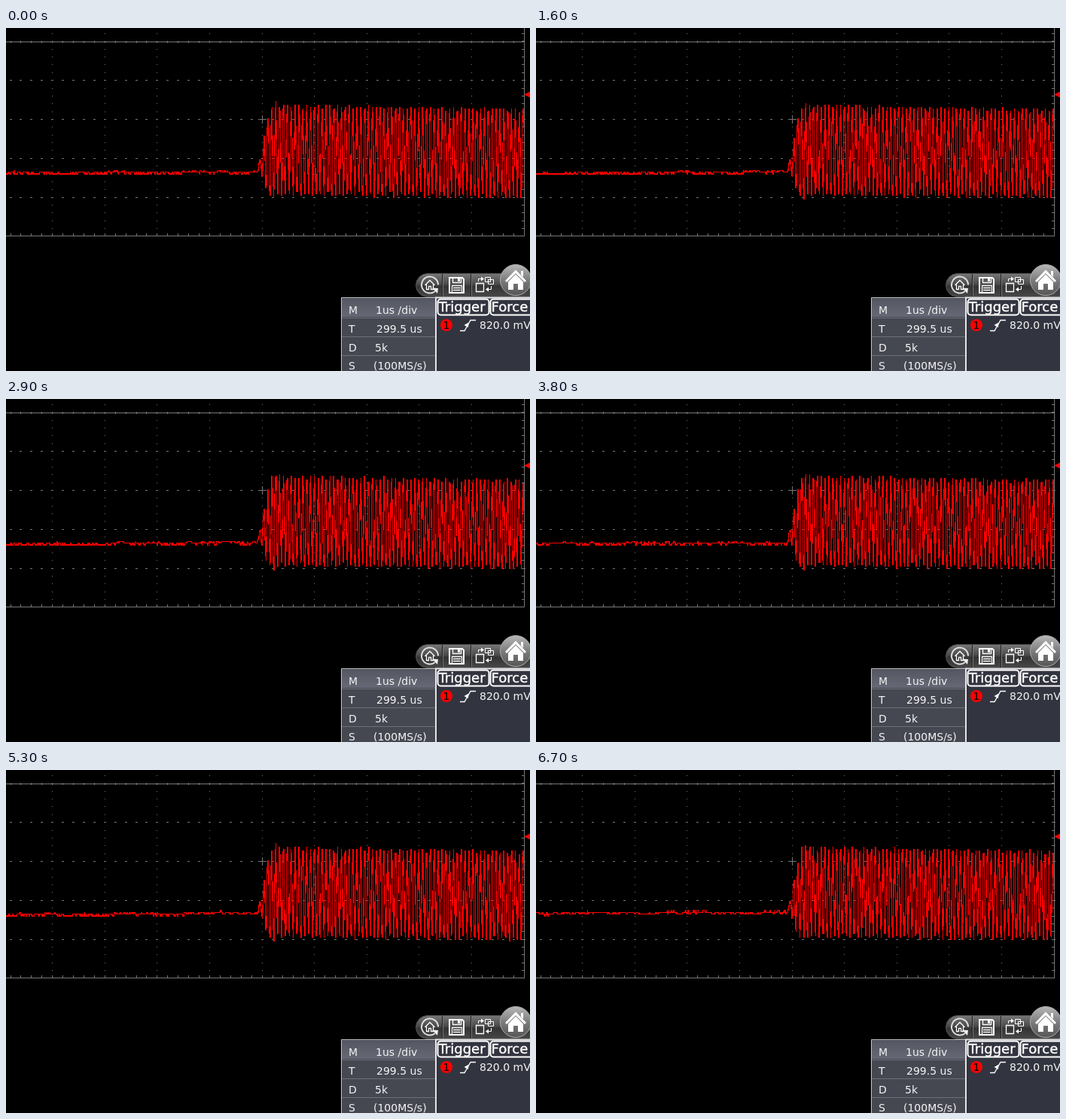
Recreate the animation shown at these times as an HTML page with a canvas. Size 696 px wide and 456 px high, loop 6800 ms.

```html
<!DOCTYPE html>
<html lang="en">
<head>
<meta charset="utf-8">
<title>Oscilloscope burst</title>
<style>
  html, body { margin: 0; width: 100%; height: 100%; overflow: hidden; background: #000; }
  canvas, svg { position: absolute; left: 0; top: 0; width: 696px; height: 456px; display: block; }
  text { font: 14px "DejaVu Sans", sans-serif; fill: #f4f4f4; white-space: pre; }
  .button text { font-size: 18px; fill: #fff; stroke: #fff; stroke-width: .4; }
  .button rect { fill: #32343f; stroke: #fff; stroke-width: 2; }
  .icon { fill: none; stroke: #fff; stroke-width: 1.3; }
</style>
</head>
<body>
<canvas id="scope" width="696" height="456"></canvas>
<svg viewBox="0 0 696 456">
  <defs>
    <linearGradient id="bar" x2="0" y2="1">
      <stop offset="0" stop-color="#777"/>
      <stop offset=".45" stop-color="#4b4b4b"/>
      <stop offset=".55" stop-color="#343434"/>
      <stop offset="1" stop-color="#484848"/>
    </linearGradient>
    <linearGradient id="knob" x2="0" y2="1">
      <stop offset="0" stop-color="#b8b8b8"/>
      <stop offset=".5" stop-color="#7d7d7d"/>
      <stop offset="1" stop-color="#555"/>
    </linearGradient>
    <linearGradient id="row" x2="0" y2="1">
      <stop offset="0" stop-color="#555762"/>
      <stop offset="1" stop-color="#666975"/>
    </linearGradient>
  </defs>

  <path d="M688 88.5L696 84.500V92.500Z" fill="#f00"/>

  <!-- toolbar -->
  <path d="M696 326.5H560a15.5 15.5 0 0 0 0 31H696Z" fill="url(#bar)" stroke="#555"/>
  <path d="M579.5 327V357M617.5 327V357" stroke="#222"/>
  <path d="M580.5 327V357M618.5 327V357" stroke="#777"/>
  <g class="icon">
    <path d="M570 350A11 11 0 1 1 574 341.500" stroke="#ddd" stroke-width="2"/>
    <path d="M556.500 342L563 335.500L569.500 342M558.500 341V347.500H561.500V343.500H564.500V347.500H567.500V341"/>
    <path d="M566 345.500L574 346L573 353Z" fill="#eee" stroke="none"/>
  </g>
  <g class="icon">
    <path d="M589 332H606L608 334V352H589Z" stroke-width="2"/>
    <path d="M593.500 332V338.500H604.500V332M592.500 352V342.500H605.500V352M594 345.500H604M594 348.500H604"/>
    <path d="M600 333H603V337H600Z" fill="#fff" stroke="none"/>
  </g>
  <g class="icon">
    <path d="M624.500 339.500H634.500V350.500H624.500Z"/>
    <path d="M636.500 331.500H643.500V337.500H636.500ZM640.500 334.500H647.500V340.500H640.500Z" stroke-width="1"/>
    <path d="M627.500 337V333.500H632M644.500 343V347.500H640" stroke-width="1"/>
    <path d="M631 330.500L635 333.500L631 336.500ZM641 344.500L637 347.500L641 350.500Z" fill="#fff" stroke="none"/>
  </g>
  <circle cx="677" cy="335" r="20.500" fill="url(#knob)" stroke="#aaa"/>
  <path d="M663 336L677 321.500L691 336L689 338L677 326L665 338Z" fill="#fff"/>
  <path d="M667 337.500L677 327.500L687 337.500V348H680V340H674V348H667ZM684 323H687V331L684 328Z" fill="#fff"/>

  <!-- timebase panel -->
  <path d="M445 358H571V456H445Z" fill="#454751"/>
  <path d="M446 360H570V384H446Z" fill="url(#row)"/>
  <path d="M446 385.500H570M446 410.500H570M446 435.500H570" stroke="#6d6f79"/>
  <path d="M445.500 456V358.500H570" fill="none" stroke="#c4c5ca"/>
  <text x="455" y="380">M</text><text x="491" y="380">1us /div</text>
  <text x="455" y="405">T</text><text x="492" y="405">299.5 us</text>
  <text x="455" y="430">D</text><text x="490" y="430">5k</text>
  <text x="455" y="454">S</text><text x="488" y="454">(100MS/s)</text>

  <!-- trigger panel -->
  <path d="M572 358H696V456H572Z" fill="#32343f"/>
  <path d="M571 456V358.500H696" fill="none" stroke="#e4e4e8" stroke-width="2"/>
  <g class="button">
    <rect x="573.500" y="360.500" width="68" height="21" rx="4"/>
    <rect x="643.500" y="360.500" width="60" height="21" rx="4"/>
    <text x="574.500" y="377">Trigger</text>
    <text x="644.500" y="377">Force</text>
  </g>
  <circle cx="585" cy="395" r="8" fill="#f00"/>
  <text x="580.500" y="400" style="fill:#000">1</text>
  <path class="icon" d="M603 402.500H609L617 388.500H624"/>
  <path d="M614.500 391.500L608.500 395L614 398Z" fill="#fff"/>
  <text x="629" y="400">820.0 mV</text>
</svg>
<script>
const LOOP = 6800, STEP = 100;
const DIV_X = 69.6, DIV_Y = 51.8, RIGHT = 687.6, BOTTOM = 276.4, AXIS = 18;
const LEVEL = 2.55, FLOOR = 194;          // height of one converter step, idle row
const SAMPLE = DIV_X / 100;               // 100 MS/s at 1 us per division
const HALF = DIV_X / 13.56 / 2;           // half a carrier cycle
const START = 337;
const ATTACK = [174, 196, 144, 215, 119, 223, 102, 227, 97, 223, 101];

// step, idle level at the left, idle level at the trigger
const DRIFT = [
  [0, 193.3, 191.4], [16, 194.1, 191], [29, 193.6, 190.6], [38, 191.9, 191.6],
  [46, 192.8, 189.2], [59, 193.2, 191.4], [67, 190, 189.5], [68, 193.3, 191.4]
];

const ctx = document.getElementById("scope").getContext("2d");
const mix = (a, b, f) => a + (b - a) * f;
const dot = (x, y, w, h) => ctx.fillRect(Math.round(x), Math.round(y), w, h);

function random(seed) {
  let s = (seed + 1) * 2654435761 >>> 0;
  return () => {
    s = s + 0x6d2b79f5 >>> 0;
    let v = Math.imul(s ^ s >>> 15, s | 1);
    v ^= v + Math.imul(v ^ v >>> 7, v | 61);
    return ((v ^ v >>> 14) >>> 0) / 4294967296;
  };
}

function drawGrid() {
  ctx.fillStyle = "#777";
  dot(0, AXIS, 688, 1);
  dot(0, BOTTOM, 689, 1);
  dot(RIGHT, 0, 1, 276);
  for (let x = RIGHT; x > 0; x -= DIV_X / 5) {
    dot(x, AXIS - 1, 1, 3);
    dot(x, BOTTOM - 3, 1, 3);
    for (let y = BOTTOM - DIV_Y; y > AXIS + 9; y -= DIV_Y) dot(x - 1, y, 3, 1);
  }
  for (let y = BOTTOM; y > 0; y -= DIV_Y / 5) {
    dot(RIGHT - 3, y, 3, 1);
    for (let x = RIGHT - DIV_X; x > 0; x -= DIV_X) dot(x, y, 1, 1);
  }
  dot(335, 121, 11, 1);
  dot(340, 116, 1, 11);
}

function extreme(h) {
  if (h < ATTACK.length) return ATTACK[h];
  const f = (START + h * HALF - 360) / 328;
  return h % 2 ? 221.5 + 4 * f : 101.5 + 5.5 * f;
}

function burst(x) {
  const u = (x - START) / HALF, h = Math.floor(u);
  return mix(extreme(h), extreme(h + 1), (1 - Math.cos(Math.PI * (u - h))) / 2);
}

function drawTrace(step) {
  const rnd = random(step);
  const k = DRIFT.findIndex(d => d[0] > step);
  const a = DRIFT[k - 1], b = DRIFT[k], f = (step - a[0]) / (b[0] - a[0]);
  const left = mix(a[1], b[1], f), right = mix(a[2], b[2], f);
  const waves = [rnd() * 7, rnd() * 7];
  const snap = y => FLOOR - Math.max(-13, Math.round((FLOOR - y) / LEVEL)) * LEVEL;

  ctx.fillStyle = "#f00";
  let px = 0, py = snap(left), idle = py;
  for (let x = -rnd() * SAMPLE; x < RIGHT - 0.2; x += SAMPLE) {
    let y;
    if (x < START - 4) {
      const sway = Math.sin(x / 19 + waves[0]) + Math.sin(x / 7.3 + waves[1]);
      const noisy = mix(left, right, x / START) + sway * 0.7 + (rnd() - 0.5) * 4.2;
      if (rnd() < 0.6) idle = Math.min(FLOOR, snap(noisy));
      y = idle;
    } else if (x < START) {
      const rise = (x - START + 4) / 4;
      y = snap(mix(right, ATTACK[0], rise * rise * (3 - 2 * rise)));
    } else {
      y = snap(burst(x) + (rnd() - 0.5) * 2);
    }
    const cx = Math.max(0, Math.round(x)), ry = Math.round(y), oy = Math.round(py);
    const mid = Math.round((oy + ry) / 2);
    dot(px, Math.min(oy, mid), 1, Math.abs(mid - oy) + 1);
    dot(cx, Math.min(oy, ry), 1, Math.abs(ry - oy) + 1);
    if (x < START - 4 && ry === FLOOR) dot(cx, FLOOR - 1, 1, 2);
    px = cx;
    py = y;
  }
}

let shown = -1;
function tick() {
  let step = Math.floor(performance.now() % LOOP / STEP);
  if (step > 24 && step < 29) step = 24;  // acquisition pauses here
  if (step !== shown) {
    shown = step;
    ctx.fillStyle = "#000";
    ctx.fillRect(0, 0, 696, 456);
    drawGrid();
    drawTrace(step);
  }
  requestAnimationFrame(tick);
}
tick();
</script>
</body>
</html>
```
